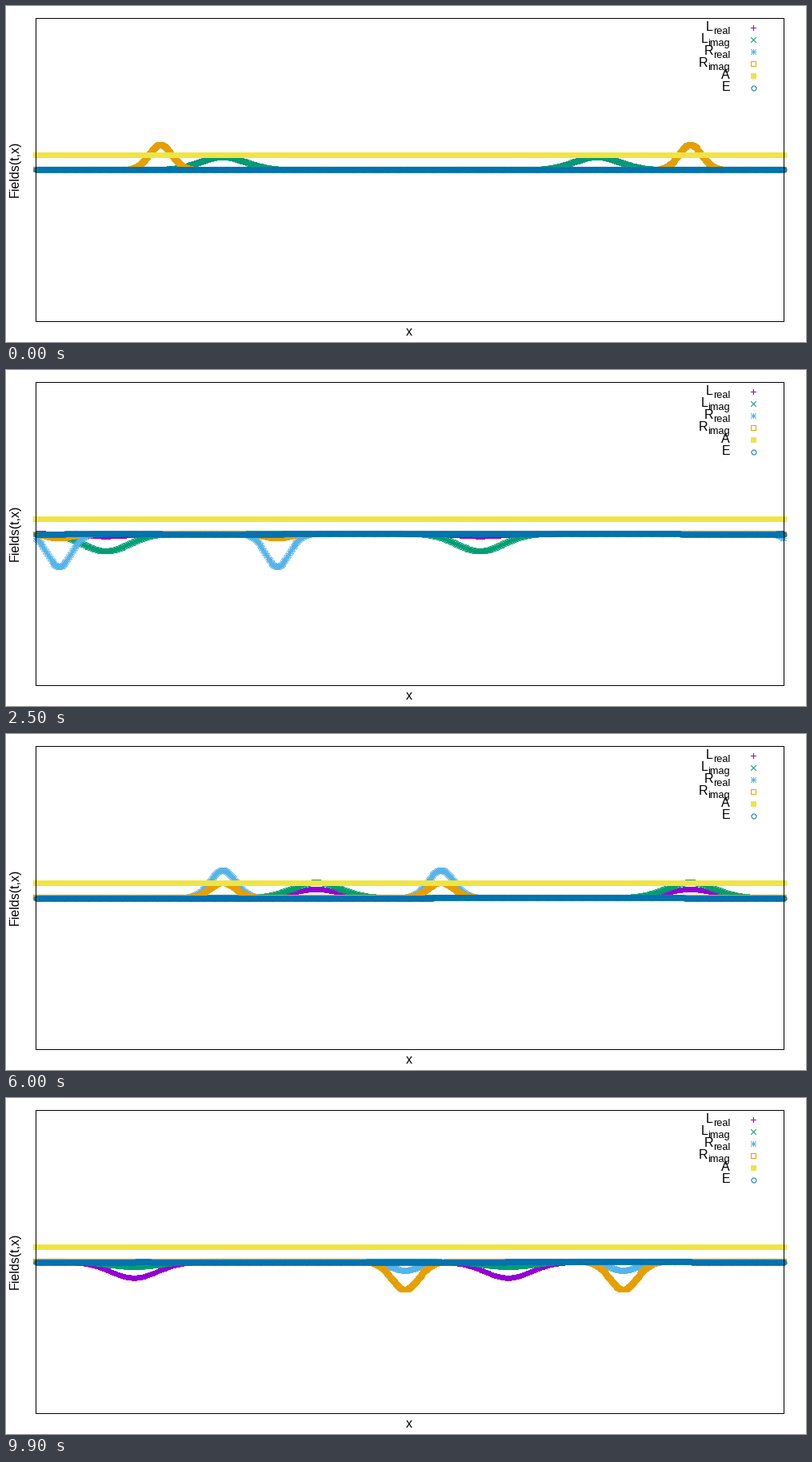
Animation, 1000 px wide and 420 px high, one loop 10000 ms. Source, as a matplotlib script:

```python
import math

import numpy as np
import matplotlib.pyplot as plt
from matplotlib.animation import FuncAnimation
from matplotlib.markers import MarkerStyle
from matplotlib.path import Path

W, H, DPI = 1000, 420, 100
FRAMES, STEP = 100, 100
PX = 72 / DPI                      # points per pixel
X0, X1, Y0, Y1 = 37, 972, 15, 394  # plot box
BASE = 204.4                       # height of zero
SPEED = 1 / 160                    # box widths per frame
SPIN = 0.1                         # phase per frame, radians

u = np.linspace(0, 1, 1001)
xs = np.round(X0 + u * (X1 - X0))

plt.rcParams["font.family"] = "Liberation Sans"
fig = plt.figure(figsize=(W / DPI, H / DPI), dpi=DPI, facecolor="white")
ax = fig.add_axes([0, 0, 1, 1])
ax.set_xlim(0, W)
ax.set_ylim(H, 0)
ax.axis("off")

# small ring, in pixels, centred on the middle of a pixel
ring = np.array([(3, 1), (1, 3), (-1, 3), (-3, 1),
                 (-3, -1), (-1, -3), (1, -3), (3, -1), (3, 1)]) + (0.5, -0.5)
RING = Path(ring, closed=True)

# marker shapes, size in px, colour, filled, label, subscript
SERIES = [
    (["+"], 6, "#9400d3", False, "L", "real"),
    (["x"], 6, "#009e73", False, "L", "imag"),
    (["+", "x"], 6, "#56b4e9", False, "R", "real"),
    (["s"], 6, "#e69f00", False, "R", "imag"),
    (["s"], 6, "#f0e442", True, "A", ""),
    ([RING], 7, "#0072b2", False, "E", ""),
]


def text(x, y, s, size=16, **kw):
    return ax.text(x, y, s, fontsize=size * PX, color="black", zorder=20, **kw)


def markers(x, y, shapes, size, color, filled, z):
    face = color if filled else "none"
    return [ax.plot(x, y, ls="none", marker=MarkerStyle(s, capstyle="projecting"),
                    ms=size * PX, mec=color, mfc=face, mew=PX,
                    antialiased=False, zorder=z)[0] for s in shapes]


def text_width(s, size):
    t = text(0, 0, s, size)
    w = t.get_window_extent(fig.canvas.get_renderer()).width
    t.remove()
    return w


groups = []
for i, (shapes, size, color, filled, name, sub) in enumerate(SERIES):
    row = 15 * i
    groups.append(markers(xs, xs * 0, shapes, size, color, filled, 2 + i))
    markers([934], [27 + row], shapes, size, color, filled, 12)
    right = 905
    if sub:
        text(right, 35 + row, sub, 12.8, ha="right", va="baseline")
        right -= text_width(sub, 12.8)
    text(right, 31 + row, name, ha="right", va="baseline")

ax.plot([X0, X1, X1, X0, X0], [Y0, Y0, Y1, Y1, Y0], color="black", lw=PX,
        solid_capstyle="projecting", solid_joinstyle="miter",
        antialiased=False, zorder=15)
text(504, 412, "x", ha="center", va="baseline")
text(11.3, 203.5, "Fields(t,x)", rotation=90, ha="center", va="center")


def packets(n, centers, direction, width, height):
    """Two periodic pulses that drift and slowly spread."""
    spread = math.sqrt(1 + 0.0044 * n * (0.015 / width) ** 2)
    total = np.zeros_like(u)
    for c in centers:
        d = (u - c - direction * SPEED * n + 0.5) % 1 - 0.5
        total += np.exp(-0.5 * (d / (width * spread)) ** 2)
    return height / spread * total


def right_pulse(n):
    return packets(n, (1 / 6, 7 / 8), 1, 0.015, 44)


def left_pulse(n):
    return packets(n, (1 / 4, 3 / 4), -1, 0.03, 22.4)


# the passing pulses leave a faint trace in E
flow = np.array([left_pulse(n) ** 2 - right_pulse(n) ** 2 for n in range(FRAMES)])
trace = np.cumsum(flow, axis=0) - flow
trace *= 0.6 / (44 ** 2 * 0.015 * math.sqrt(math.pi) / SPEED)


def draw(n):
    left, right = left_pulse(n), right_pulse(n)
    a, b = math.pi / 4 - SPIN * n, math.pi / 4 + SPIN * n
    values = (left * math.cos(a), left * math.sin(a),
              right * math.cos(b), right * math.sin(b),
              18 + 0 * u, trace[n])
    for group, v in zip(groups, values):
        for line in group:
            line.set_ydata(np.round(BASE - v))
    return sum(groups, [])


anim = FuncAnimation(fig, draw, frames=FRAMES, interval=STEP,
                     init_func=lambda: draw(0), repeat=True,
                     repeat_delay=0, blit=False)
plt.show()
```
